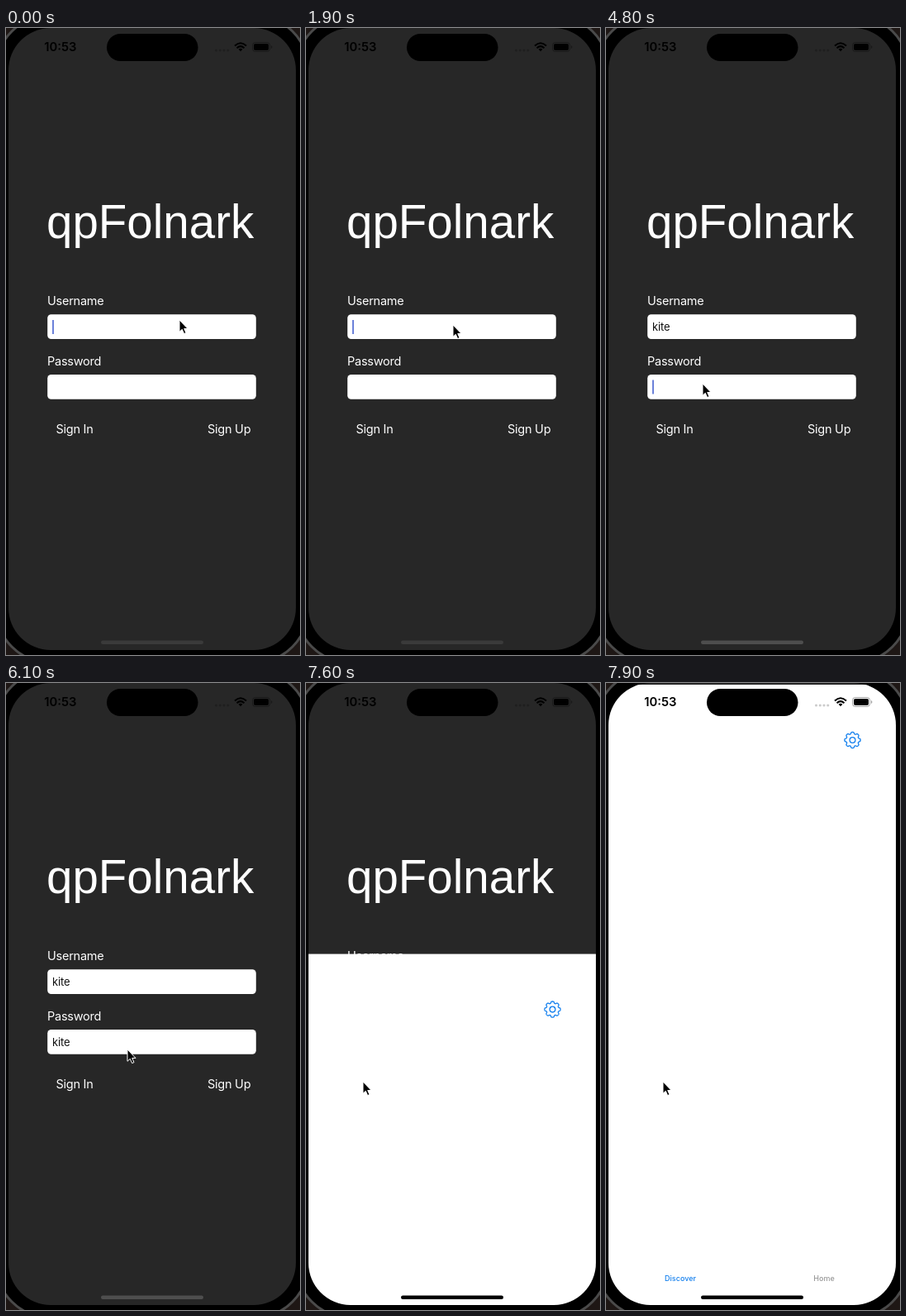
An HTML page for the animation above (8000 ms loop, 356 by 758 pixels).

```html
<!DOCTYPE html>
<html lang="en">
<head>
<meta charset="utf-8">
<title>Sign in</title>
<style>
  html, body { margin: 0; width: 100%; height: 100%; overflow: hidden; background: #1e1715; }
  svg { display: block; width: 356px; height: 758px; }
  text { font-family: Inter, sans-serif; white-space: pre; }
  .title { font: 56.5px "Liberation Sans", Arial, sans-serif; fill: #fff; }
  .label { font-size: 14.5px; letter-spacing: -.25px; fill: #fff; }
  .input { font-size: 13px; letter-spacing: -.1px; fill: #111; }
  .clock { font-size: 14.8px; font-weight: 600; }
  .tab { font-size: 9px; font-weight: 500; text-anchor: middle; }
</style>
</head>
<body>
<svg viewBox="0 0 356 758">
  <defs>
    <clipPath id="glass"><rect x="3" y="0" width="348" height="752" rx="51"/></clipPath>
  </defs>

  <rect x="-12" y="-15" width="378" height="782" rx="65" fill="#000" stroke="#4a4a4a" stroke-width="3"/>

  <g clip-path="url(#glass)">
    <rect width="356" height="758" fill="#272727"/>
    <text class="title" x="49" y="254">qpFolnark</text>
    <text class="label" x="50" y="335">Username</text>
    <text class="label" x="50" y="408">Password</text>
    <text class="label" x="60.5" y="490">Sign In</text>
    <text class="label" x="244" y="490">Sign Up</text>
    <g fill="#fff">
      <rect x="50.2" y="346.2" width="252.6" height="29.8" rx="4.5"/>
      <rect x="50.2" y="419" width="252.6" height="29.8" rx="4.5"/>
    </g>
    <text class="input" id="user" x="56" y="366"></text>
    <text class="input" id="pass" x="56" y="438.5"></text>
    <rect id="caret" width="1.6" height="17" fill="#4763d0"/>

    <g id="popup">
      <path d="M44 331H80.5Q83.5 331 83.5 334V342Q83.5 345 80.5 345H61L57 348L53 345H44Q41 345 41 342V334Q41 331 44 331Z" fill="#b4b4b4"/>
      <text x="46" y="340" font-size="5.5" fill="#444">Paste</text>
      <rect x="72" y="335.5" width="5" height="5" fill="none" stroke="#444" stroke-width=".7" stroke-dasharray="3 2" stroke-dashoffset="1.5"/>
    </g>

    <g id="sheet">
      <rect width="356" height="760" fill="#fff"/>
      <g transform="translate(298.5 67)" fill="none" stroke="#1580ee" stroke-width="1.3">
        <path id="gear" stroke-linejoin="round"/>
        <circle r="3.4"/>
      </g>
      <text class="tab" x="90" y="721" fill="#1580ee">Discover</text>
      <text class="tab" x="264" y="721" fill="#999">Home</text>
    </g>

    <rect id="home" x="115" y="740.5" width="124" height="4.5" rx="2.25"/>
    <text class="clock" x="46.3" y="28">10:53</text>
    <path d="M254.5 27H270" stroke="#000" stroke-width="3.2" stroke-linecap="round" stroke-dasharray="0 4.75" opacity=".2"/>
    <g fill="none" stroke="#000" stroke-width="2">
      <path d="M277 21.5Q284 15 291 21.5M279.5 24.2Q284 20 288.5 24.2"/>
      <path d="M284 28.3L281.6 25.8Q284 23.7 286.4 25.8Z" fill="#000" stroke="none"/>
    </g>
    <rect x="298.5" y="17.5" width="21" height="11" rx="3.3" fill="none" stroke="#000" opacity=".35"/>
    <rect x="300" y="19" width="18" height="8" rx="2"/>
    <path d="M321 21V25Q322.3 24.5 322.3 23T321 21Z" opacity=".4"/>
  </g>

  <rect x="122" y="7" width="110.5" height="33" rx="16.5"/>
  <path id="pointer" d="M0 0V14.3L3.3 11.3L5.6 16.6L8 15.6L5.7 10.5H10Z" stroke="#fff" stroke-linejoin="round"/>
</svg>

<script>
const LOOP = 8000, STEP = 100, WORD = "kite";
const PASS_FOCUS = 4500, PASS_TYPE = 5500, BLUR = 6100, SHEET_SHOW = 7300, SHEET_RISE = 7509;

// Pointer moves: start, end, x, y
const moves = [
  [0, 0, 210, 353],
  [300, 1100, 178, 359],
  [2100, 2300, 140, 369],
  [4100, 4600, 117, 430],
  [6000, 6100, 147, 443],
  [6500, 7100, 69, 482]
];
// Taps and key presses that keep the caret solid for a while
const wakes = [-300, 1900, 3000, 3500, PASS_FOCUS, PASS_TYPE];

const $ = id => document.getElementById(id);
const set = (id, attrs) => {
  for (const k in attrs) $(id).setAttribute(k, attrs[k]);
};
const ramp = (t, from, to) => Math.max(0, Math.min(1, (t - from) / (to - from || 1)));
const ease = p => p * p * (3 - 2 * p);
const typed = (t, start, gap) => WORD.slice(0, Math.max(0, Math.floor((t - start) / gap) + 1));

function pointerAt(t) {
  return moves.reduce(([px, py], [from, to, x, y]) => {
    const p = ease(ramp(t, from, to));
    return [px + (x - px) * p, py + (y - py) * p];
  }, moves[0].slice(2));
}

function caretOn(t) {
  const idle = t - wakes.filter(w => w <= t).pop();
  return t < BLUR && (idle < 900 || (idle - 900) % 950 >= 300);
}

// Critically damped spring
function sheetTop(t) {
  const s = Math.max(0, t - SHEET_RISE) * .0208;
  return 751.7 * (1 + s) * Math.exp(-s);
}

function gearPath(teeth) {
  const n = teeth * 20;
  const points = Array.from({ length: n }, (_, i) => {
    const a = i / n * 2 * Math.PI;
    const r = 8.5 + 1.1 * Math.tanh(1.8 * Math.cos(teeth * a) + .5);
    return (r * Math.cos(a)).toFixed(2) + " " + (r * Math.sin(a)).toFixed(2);
  });
  return "M" + points.join("L") + "Z";
}

function draw(t) {
  const typing = t >= PASS_TYPE && t < BLUR;
  set("pointer", { transform: `translate(${pointerAt(t)})`, opacity: typing ? 0 : 1 });

  $("user").textContent = typed(t, 3200, 100);
  $("pass").textContent = typed(t, PASS_TYPE, 130);
  const inPass = t >= PASS_FOCUS;
  const field = $(inPass ? "pass" : "user");
  const width = field.textContent ? field.getComputedTextLength() : 0;
  set("caret", { x: 56.2 + width, y: inPass ? 425.5 : 353, opacity: caretOn(t) ? 1 : 0 });

  set("popup", { opacity: .8 * Math.max(0, 1 - Math.abs(t - 3600) / 200) });
  set("sheet", {
    transform: `translate(0 ${sheetTop(t)})`,
    visibility: t >= SHEET_SHOW ? "visible" : "hidden"
  });
  const gray = t > SHEET_RISE ? 0 : 58 + 20 * ramp(t, 2900, 3500);
  set("home", { fill: `rgb(${gray},${gray},${gray})` });
}

function tick() {
  const t = performance.now() % LOOP;
  draw(Math.floor(t / STEP) * STEP);
  requestAnimationFrame(tick);
}

set("gear", { d: gearPath(8) });
tick();
</script>
</body>
</html>
```
